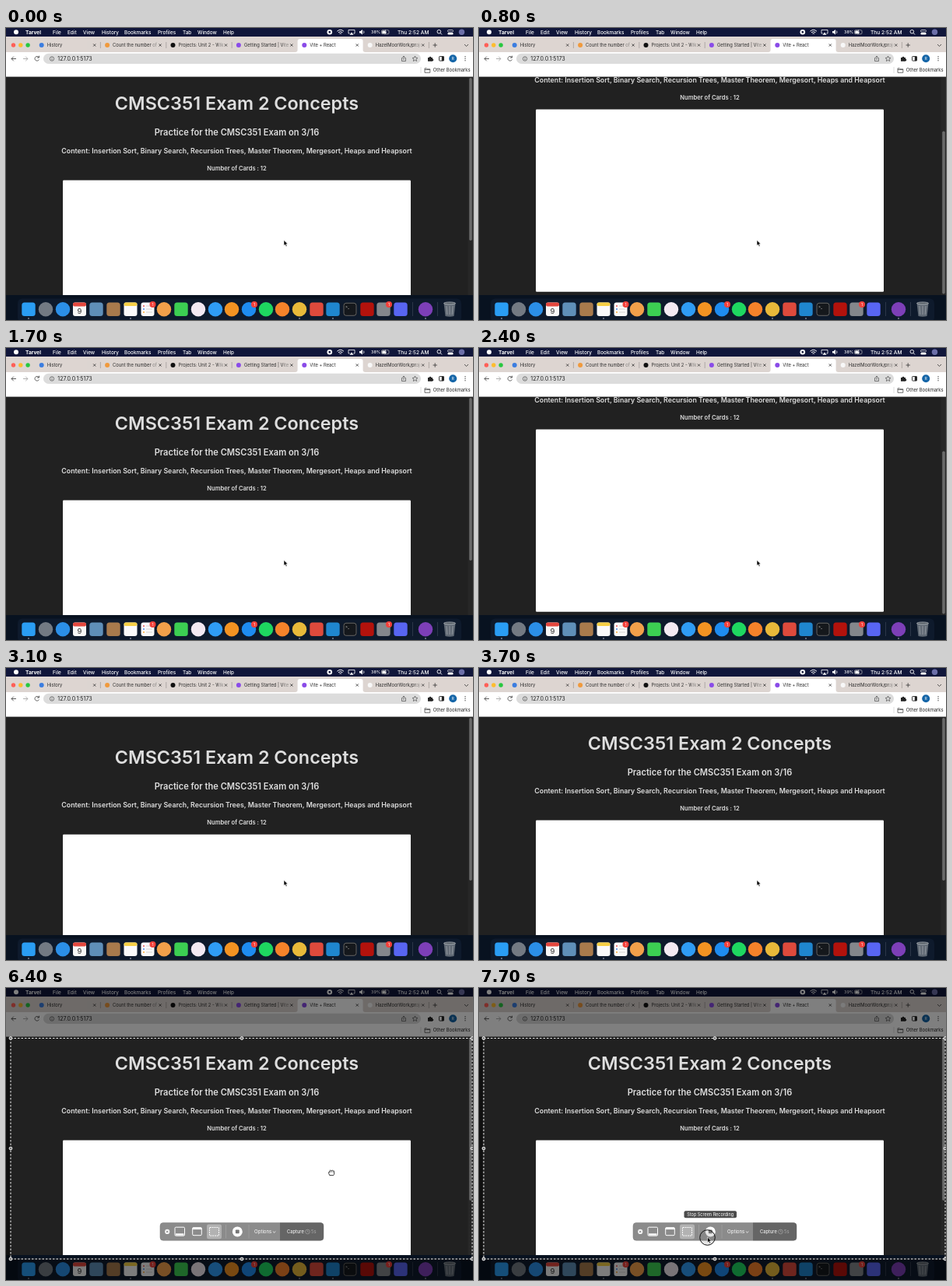
These frames come from a looping animation (600 by 375 pixels, 7800 ms). An HTML page:

```html
<!DOCTYPE html>
<html lang="en">
<head>
<meta charset="utf-8">
<title>Exam concepts</title>
<style>
html, body { margin: 0; width: 100%; height: 100%; overflow: hidden; background: #081220; }
svg { display: block; }
text { font-family: Inter, "Open Sans", sans-serif; white-space: pre; }
</style>
</head>
<body>
<svg id="stage" width="600" height="375" viewBox="0 0 600 375"></svg>
<script>
const LOOP = 7800;
const STRIP = '#ddd5d1';
const stage = document.getElementById('stage');

const rect = (x, y, w, h, fill, r = 0, extra = '') =>
  `<rect x="${x}" y="${y}" width="${w}" height="${h}" rx="${r}" fill="${fill}" ${extra}/>`;
const disc = (x, y, r, fill, extra = '') =>
  `<circle cx="${x}" cy="${y}" r="${r}" fill="${fill}" ${extra}/>`;
const line = (d, color, w = 0.8, extra = '') =>
  `<path d="${d}" fill="none" stroke="${color}" stroke-width="${w}" ${extra}/>`;
const label = (x, y, str, size, fill, weight = 400, extra = '') =>
  `<text x="${x}" y="${y}" font-size="${size}" fill="${fill}" font-weight="${weight}" ${extra}>${str}</text>`;
const centered = (y, str, size) =>
  label(296.5, y, str, size, '#dedede', 600, 'text-anchor="middle"');
const cross = (x, y, r, color) =>
  line(`M${x - r} ${y - r}l${2 * r} ${2 * r}m0 ${-2 * r}l${-2 * r} ${2 * r}`, color);

function menuBar() {
  const items = [[60, 'File'], [79, 'Edit'], [99, 'View'], [123, 'History'], [152, 'Bookmarks'],
    [195, 'Profiles'], [227, 'Tab'], [246, 'Window'], [279, 'Help']];
  return rect(0, 0, 600, 11, '#10163a') +
    disc(13, 5.2, 3, '#fff') +
    label(25, 7.6, 'Tarvel', 6.6, '#fff', 700) +
    items.map(([x, s]) => label(x, 7.6, s, 6.4, '#fff', 500)).join('') +
    disc(415.8, 5.3, 3.3, '#fff') + rect(414.6, 4.1, 2.4, 2.4, '#10163a', 0.4) +
    line('M425.5 4.2q4.2-3.8 8.4 0M427 5.8q2.7-2.4 5.4 0M428.5 7.3q1.2-1 2.4 0', '#fff', 1) +
    line('M441.5 7H440V2.5h8V7h-1.5', '#fff') +
    '<path d="M441.5 8.8l2.5-3.2 2.5 3.2z" fill="#fff"/>' +
    '<path d="M454 4h1.5L458 2v6.6L455.5 6.5H454z" fill="#fff"/>' +
    line('M459.3 3.5q1.4 1.7 0 3.5', '#fff') +
    label(469, 7.4, '38%', 5.4, '#fff', 500, 'id="battery"') +
    rect(482.5, 2.7, 9.5, 5, 'none', 1.3, 'stroke="#bbb" stroke-width=".7"') +
    rect(483.3, 3.5, 3.6, 3.4, '#fff', 0.5) +
    '<path d="M488 1.8l-2.5 4h1.7l-.6 3 2.7-4h-1.7z" fill="#fff"/>' +
    label(503, 7.6, 'Thu 2:52 AM', 6.6, '#fff', 500) +
    disc(556.3, 4.7, 2.3, 'none', 'stroke="#fff" stroke-width=".9"') +
    line('M558 6.4l2 2', '#fff', 1) +
    rect(567.5, 2.5, 7, 2.5, 'none', 1.2, 'stroke="#fff" stroke-width=".7"') +
    rect(567.5, 6, 7, 2.5, '#fff', 1.2) +
    disc(585.5, 5.3, 3.7, '#6c6fa8');
}

function tab(i, title, color) {
  const x = 37 + i * 84.4;
  const active = i === 4;
  const back = active
    ? `<path d="M${x - 3} 31q3 0 3-3V17q0-3 3-3h78q3 0 3 3v11q0 3 3 3z" fill="#fff"/>`
    : (i !== 3 ? line(`M${x + 84.4} 18v8`, '#8f8a88', 0.6) : '');
  return back + disc(x + 8.7, 22, 3, color) +
    `<svg x="${x + 15.7}" y="14" width="57.5" height="16">` +
    label(0, 10.1, title, 5.8, '#2c2c2c') + '</svg>' +
    rect(x + 67, 17, 7, 10, active ? '#fff' : STRIP, 0, 'opacity=".55"') +
    cross(x + 76.7, 22, 1.6, '#333');
}

function browserFrame() {
  const lights = ['#ff5f57', '#febc2e', '#28c840'];
  const tabs = [['History', '#3b7de0'], ['Count the number of', '#f09a3c'],
    ['Projects: Unit 2 - Wiki', '#111'], ['Getting Started | Vite', '#8a4be8'],
    ['Vite + React', '#8a4be8'], ['HazelMoorWork/project', '#f8f8f8']];
  const ink = '#4b4b4b';
  return rect(0, 11, 600, 20, STRIP) + rect(0, 31, 600, 32, '#fff') +
    lights.map((c, i) => disc(9.5 + i * 9.3, 22, 2.7, c)).join('') +
    tabs.map(([s, c], i) => tab(i, s, c)).join('') +
    line('M548.5 22h5.4M551.2 19.3v5.4', '#333') +
    line('M589 21l2.5 2.5 2.5-2.5', '#333') +
    line('M13 39.5H7m2.8-2.8L7 39.5l2.8 2.8', ink, 0.9) +
    line('M22 39.5h6m-2.8-2.8l2.8 2.8-2.8 2.8', '#a8a8a8', 0.9) +
    line('M42 37.5a2.8 2.8 0 1 0 .4 3M42.5 35.7v2.4h-2.4', ink, 0.9) +
    rect(48, 32.8, 485, 13.2, '#dcdcdc', 6.6) +
    disc(59, 39.5, 2.7, 'none', `stroke="${ink}" stroke-width=".7"`) +
    line('M59 39.2v1.8M59 37.7v.7', ink, 0.7) +
    label(66.3, 41.8, '127.0.0.1:5173', 7.1, '#222') +
    line('M509.5 38.5H508.5v4h5v-4h-1M511 41v-5m-1.5 1.5l1.5-1.5 1.5 1.5', ink, 0.7) +
    line('M525.5 36l1 2.2 2.4.3-1.8 1.6.5 2.4-2.1-1.2-2.1 1.2.5-2.4-1.8-1.6 2.4-.3z', ink, 0.7) +
    '<path d="M542 38h1.7a1.3 1.3 0 1 1 2.6 0h1.7v1.7a1.3 1.3 0 1 1 0 2.6v.5h-6z" fill="#222"/>' +
    rect(556.5, 36.5, 6, 5.6, 'none', 0.7, 'stroke="#222" stroke-width=".9"') +
    rect(559.8, 36.5, 2.7, 5.6, '#222') +
    disc(574.2, 39.2, 5, '#1565a7') +
    label(574.2, 41.1, 'R', 5, '#fff', 400, 'text-anchor="middle"') +
    [36.7, 39.2, 41.7].map(y => disc(590, y, 0.7, ink)).join('') +
    line('M533 50v8', '#ccc', 0.6) +
    line('M538 51.8h2.5l.8 1h3.5v4.5H538zM538 53.5h6.8', ink, 0.8) +
    label(548.8, 56.2, 'Other Bookmarks', 5.8, '#222');
}

function page() {
  return '<clipPath id="view"><rect y="62" width="600" height="281"/></clipPath>' +
    rect(0, 62.6, 600, 280.4, '#212121') +
    '<g clip-path="url(#view)"><g id="content">' +
    centered(105, 'CMSC351 Exam 2 Concepts', 23.4) +
    centered(137.7, 'Practice for the CMSC351 Exam on 3/16', 11.1) +
    centered(161, 'Content: Insertion Sort, Binary Search, Recursion Trees, Master Theorem, Mergesort, Heaps and Heapsort', 8.8) +
    centered(182.9, 'Number of Cards : 12', 7.55) +
    rect(73, 195.6, 447, 234.2, '#fff', 1.2) +
    '</g></g>' + rect(593.5, 63, 6.5, 280, '#272727') +
    rect(595.2, 64, 3.6, 209, '#6b6b6b', 1.8, 'id="thumb"');
}

function dock() {
  const apps = [[29, '#2a9df4'], [51, '#737a83', 1], [73, '#2b8fe8', 1], [116, '#5f8fb8'],
    [138, '#a87a4c'], [203, '#f2a04a', 1], [225, '#3ccf52'], [247, '#f3e9f2', 1],
    [269, '#2f9cf5', 1], [290, '#f39322', 1], [312, '#1e8cf0', 1], [334, '#1ed760', 1],
    [355, '#f5822a', 1], [377, '#e8b93a', 1], [399, '#de4a3c'], [420, '#1f86cf'],
    [442, '#15181c'], [464, '#b3120c'], [485, '#84878c'], [507, '#5865f2'], [539, '#7d3fb8', 1]];
  const badge = (x, s) => disc(x, 355, 4, '#f2403a') +
    label(x, 356.9, s, 5, '#fff', 400, 'text-anchor="middle"');
  const rows = [356, 360, 364];
  return rect(0, 343, 600, 32, '#081220') +
    rect(15, 347.5, 570, 30, '#0e1a2c', 6) +
    apps.map(([x, c, round]) => round ? disc(x, 361.3, 9.2, c)
      : rect(x - 8.7, 352.6, 17.4, 17.4, c, 3.5)).join('') +
    rect(86, 352.6, 17, 17.4, '#f7f7f7', 3) + rect(86, 352.6, 17, 5, '#e3463d', 2) +
    label(94.5, 366.8, '9', 9.5, '#333', 400, 'text-anchor="middle"') +
    rect(151.5, 352.6, 17, 17.4, '#fafafa', 3) + rect(151.5, 352.6, 17, 4.5, '#f6cf45', 2) +
    rect(173.5, 352.6, 17, 17.4, '#fafafa', 3) +
    rows.map((y, i) => disc(177, y + 1, 1, ['#e55', '#48e', '#fa3'][i]) +
      line(`M180 ${y + 1}h8`, '#bbb', 0.6)).join('') +
    rect(434, 353.3, 16, 16, 'none', 3, 'stroke="#777" stroke-width=".8"') +
    label(436, 360, '&gt;_', 4.5, '#ddd') +
    badge(188.5, 1) + badge(319, 1) + badge(492, 1) +
    line('M522.5 352v18M554.5 352v18', '#3a4656', 0.7) +
    '<path d="M562.5 353.5h15l-2 16.5q-5.5 1.5-11 0z" fill="#858d94" opacity=".7"/>' +
    '<ellipse cx="570" cy="353.5" rx="7.5" ry="1.5" fill="#555d65" stroke="#c2c8cc" stroke-width=".7"/>' +
    line('M566 357l.8 11M570 357v11M574 357l-.8 11', '#b2b8bc', 0.6) +
    [29, 160, 377, 420, 539].map(x => disc(x, 373, 0.8, '#ccd')).join('');
}

function captureTools() {
  const [l, t, r, b] = [6, 64.5, 599, 348];
  const handles = [];
  for (const x of [l, 303, r]) for (const y of [t, 206, b])
    if (x !== 303 || y !== 206) handles.push(disc(x, y, 1.9, '#777', 'stroke="#fff" stroke-width=".9"'));
  return `<path d="M0 0H600V375H0zM${l} ${t}V${b}H${r}V${t}z" opacity=".5"/>` +
    rect(l, t, r - l, b - t, 'none', 0, 'stroke="#222" stroke-width="1"') +
    rect(l, t, r - l, b - t, 'none', 0, 'stroke="#f2f2f2" stroke-width="1" stroke-dasharray="2.5 2"') +
    handles.join('') +
    rect(198, 301.5, 210, 22.7, '#8b8b8b', 4, 'stroke="#777" stroke-width=".5"') +
    '<path d="M352 301.5h52q4 0 4 4v14.7q0 4-4 4h-52z" fill="#656565"/>' +
    disc(207.2, 312.9, 3.1, '#f4f4f4') + cross(207.2, 312.9, 1.1, '#777') +
    rect(217, 307.2, 12.5, 11, 'none', 1.3, 'stroke="#fff"') + rect(218, 315.3, 10.5, 2.3, '#fff') +
    rect(239.7, 307.7, 11.6, 10, 'none', 1.3, 'stroke="#fff"') + rect(239.7, 307.7, 11.6, 2.4, '#fff') +
    rect(258, 303.5, 19, 18.7, '#b2b2b2', 2.5) +
    rect(261.5, 307.5, 12, 10.6, 'none', 0.5, 'stroke="#fff" stroke-dasharray="1.8 1"') +
    line('M282.5 304v17.5M312 304v17.5', '#a3a3a3', 0.7) +
    disc(297.3, 312.9, 6.5, '#fff') + rect(294.9, 310.5, 4.8, 4.8, '#777', 0.8) +
    label(319, 315, 'Options', 6.1, '#fff') + line('M342.9 312.5l1.7 1.7 1.7-1.7', '#fff', 0.8) +
    label(361, 315, 'Capture', 5.8, '#fff') +
    disc(387.5, 313, 2.8, 'none', 'stroke="#aaa" stroke-width=".7"') +
    line('M387.5 311.2v2h1.3', '#aaa', 0.6) + label(392, 315, '5s', 5.8, '#aaa') +
    '<g id="tip">' + rect(263.5, 286.3, 67.5, 9, '#4b4b4b', 2) +
    label(297.2, 292.8, 'Stop Screen Recording', 5.5, '#fff', 400, 'text-anchor="middle"') + '</g>';
}

const pointers =
  '<g id="arrow"><path d="M0 0v7l1.6-1.5 1.2 2.6 1.3-.6-1.2-2.5h2.2z" fill="#000" stroke="#fff" stroke-width=".6"/></g>' +
  '<g id="hand"><path d="M-2.3 3.5L-3.5 .5q-.3-1.3 1-.8l.3.3V-2.3q.9-1.3 1.5 0 .8-1.3 1.6 0 .9-1 1.5.2 1-.6 1.3.6V1q0 1.5-1 2.7z" fill="#fff" stroke="#111" stroke-width=".8"/>' +
  line('M-.7-2v1.8M.9-2v1.8M2.4-1.7v1.5', '#333', 0.5) + '</g>';

stage.innerHTML = page() + browserFrame() + rect(0, 62.6, 600, 0.4, '#212121') + menuBar() + dock() +
  '<g id="capture">' + captureTools() + '</g>' +
  disc(293.5, 320.5, 9.8, '#777', 'id="press" fill-opacity=".18" stroke="#111" stroke-width="1"') + pointers;

const part = {};
for (const id of ['content', 'thumb', 'battery', 'capture', 'tip', 'press', 'arrow', 'hand'])
  part[id] = document.getElementById(id);

// Eased value through [time, value] stops.
function track(t, stops) {
  let [t0, v0] = stops[0];
  for (const [t1, v1] of stops) {
    if (t < t1) {
      const k = Math.max(0, (t - t0) / (t1 - t0));
      return v0 + (v1 - v0) * k * k * (3 - 2 * k);
    }
    [t0, v0] = [t1, v1];
  }
  return v0;
}

const scrollStops = [[150, 0], [700, 91], [950, 91], [1500, 0], [1800, 0], [2300, 91],
  [2550, 91], [3080, -18.2], [3130, -18.2], [3400, 0]];
const xStops = [[5500, 357], [6250, 418], [6550, 418], [7150, 293.5]];
const yStops = [[5500, 272.5], [6250, 237], [6550, 237], [7150, 320]];
const show = (node, on) => node.setAttribute('visibility', on ? 'inherit' : 'hidden');

function draw(t) {
  const scroll = track(t, scrollStops);
  part.content.setAttribute('transform', `translate(0 ${-scroll})`);
  part.thumb.setAttribute('y', 64 + Math.max(0, scroll) * 68.5 / 91);

  const capturing = t >= 5300;
  const x = track(t, xStops), y = track(t, yStops);
  const grabbing = capturing && y < 301;
  show(part.capture, capturing);
  show(part.tip, t >= 7400);
  show(part.press, t >= 7600);
  show(part.hand, grabbing);
  show(part.arrow, !grabbing);
  for (const p of [part.hand, part.arrow]) p.setAttribute('transform', `translate(${x} ${y})`);
  part.battery.textContent = capturing ? '39%' : '38%';
}

const start = performance.now();
function tick() {
  draw((performance.now() - start) % LOOP);
  requestAnimationFrame(tick);
}
tick();
</script>
</body>
</html>
```
